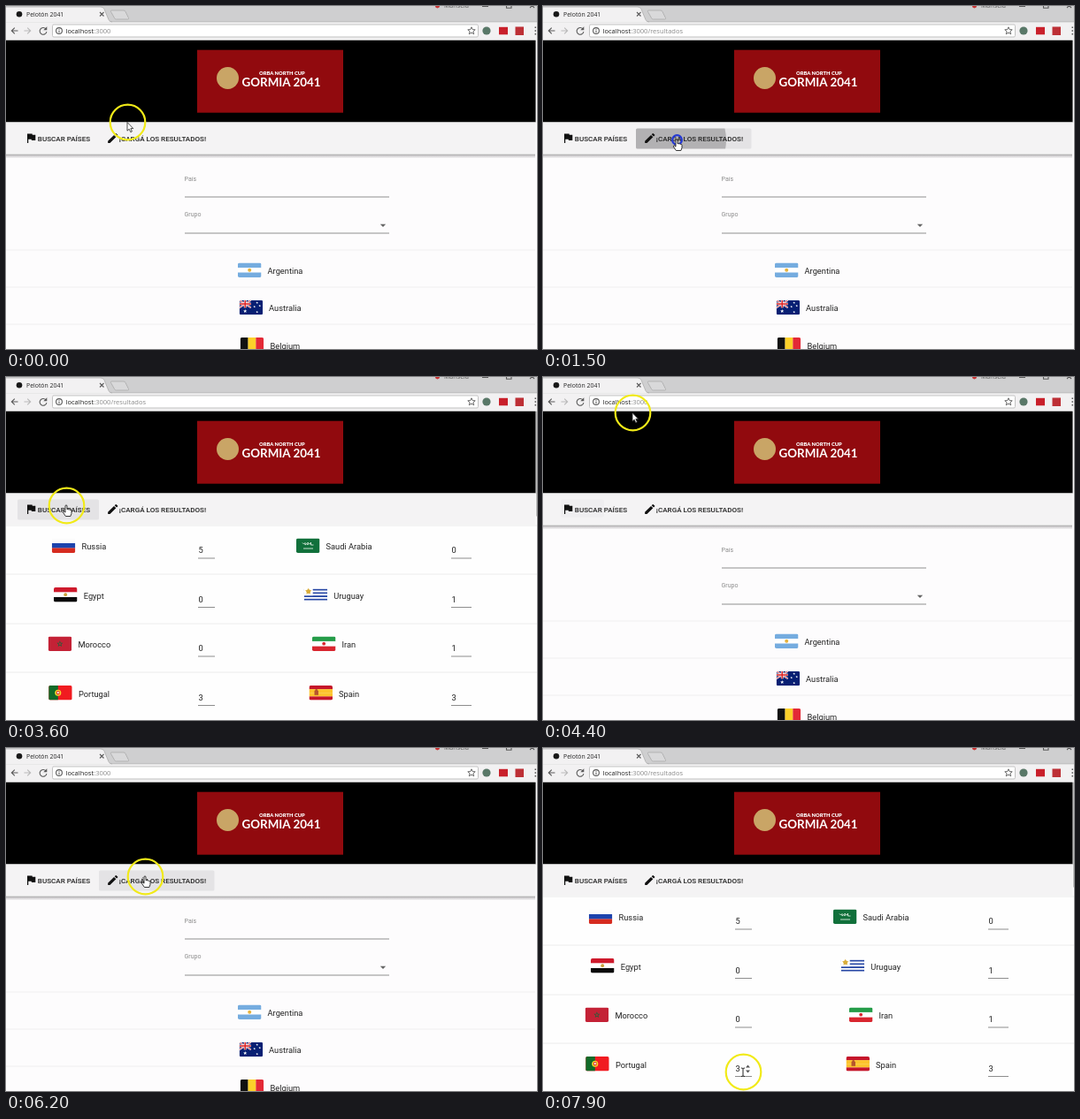
Recreate the animation shown at these times as an HTML page. Size 600 by 388 pixels, loop 8000 ms.

```html
<!DOCTYPE html>
<html lang="es">
<head>
<meta charset="utf-8">
<title>Pelotón 2041</title>
<style>
html, body { margin: 0; width: 100%; height: 100%; overflow: hidden; background: #fdfcfd; }
svg { display: block; width: 600px; height: 388px; }
text { font-family: Roboto, sans-serif; font-size: 9.3px; fill: #222; white-space: pre; }
.ui { font-family: "Open Sans", "Noto Sans", sans-serif; font-size: 7.55px; }
.nav { font-size: 8.08px; font-weight: 500; }
.label { font-size: 7px; fill: #8c8c8c; }
.brand { font-family: Lato, sans-serif; font-weight: 700; fill: #fff; }
.line { fill: none; stroke: #5a5a5a; stroke-width: 1.1; }
</style>
</head>
<body>
<svg viewBox="0 0 600 388">
  <defs>
    <clipPath id="round"><rect width="26.5" height="16.5" rx="1.8"/></clipPath>
    <clipPath id="buttonClip"><rect id="clipBox" y="139" height="23" rx="1.5"/></clipPath>
    <linearGradient id="shade" x2="0" y2="1">
      <stop offset="0" stop-color="#9c9a9c"/><stop offset=".35" stop-color="#cbc9cb"/><stop offset="1" stop-color="#fdfcfd"/>
    </linearGradient>
  </defs>
  <rect width="600" height="388" fill="#fdfcfd"/>

  <g transform="translate(0 -.5)">
    <g id="form">
      <rect y="168" width="598" height="5" fill="url(#shade)"/>
      <text class="label" x="201.5" y="198">País</text>
      <text class="label" x="201.5" y="238.5">Grupo</text>
      <path d="M202 216.5H433M202 257.5H433" stroke="#8f8f8f"/>
      <path d="M422.8 247.2h6.4l-3.2 3.2z" fill="#666"/>
      <path d="M0 276.5H598M0 318.5H598M0 360.5H598" stroke="#f0eff0"/>
    </g>
    <g id="results">
      <rect y="168" width="600" height="221" fill="#fefefe"/>
      <path d="M0 168.5H600M0 223.5H600M0 279.5H600M0 334.5H600" stroke="#ececec"/>
    </g>

    <rect y="39" width="598.5" height="93" fill="#000"/>
    <rect x="216" y="50.2" width="165" height="71" fill="#910a0e"/>
    <circle cx="250.5" cy="82" r="12.5" fill="#c9a566"/>
    <text class="brand" x="286" y="78.3" style="font-size:5.8px;font-weight:900">ORBA NORTH CUP</text>
    <text class="brand" x="266.5" y="91.5" style="font-size:13.4px">GORMIA 2041</text>

    <rect y="132" width="598.5" height="36" fill="#f4f3f4"/>
    <rect id="focus" x="20" y="139" width="49" height="20" rx="1.5" fill="#efeef0"/>
    <rect id="hover" y="139" height="23" rx="1.5" fill="#e4e3e5"/>
    <g clip-path="url(#buttonClip)"><circle id="ripple" fill="#000"/></g>
    <path transform="translate(20.9 142.6) scale(.62)" d="M14.4 6L14 4H5v17h2v-7h5.6l.4 2h7V6z" fill="#111"/>
    <path transform="translate(113.3 142.6) scale(.62)" d="M3 17.25V21h3.75L17.81 9.94l-3.75-3.75zM20.71 7.04a1 1 0 0 0 0-1.41l-2.34-2.34a1 1 0 0 0-1.41 0l-1.83 1.83 3.75 3.75z" fill="#111"/>
    <text class="nav" x="35.8" y="153.1">BUSCAR PAÍSES</text>
    <text class="nav" x="127.8" y="153.1">¡CARGÁ LOS RESULTADOS!</text>
    <path id="edge" d="M599.5 39V158" stroke="#bdbdbd"/>

    <rect width="600" height="19" fill="#cfcfd0"/>
    <path d="M0 18.5H600" stroke="#b5b5b5"/>
    <rect y="19" width="600" height="20" fill="#f2f1f2"/>
    <path d="M0 19V1.5H107Q110 1.5 111 4L116 16Q117 18.5 120 19Z" fill="#f2f1f2"/>
    <path d="M0 1.5H107Q110 1.5 111 4L116 16Q117 18.5 120 18.5" fill="none" stroke="#acacac" stroke-width=".8"/>
    <path d="M119 5.5h14q1.5 0 2 1.5l3.5 7q.5 1.5-1 1.5h-13q-1.5 0-2-1.5l-4-7q-.5-1.5.5-1.5z" fill="#d9d9da" stroke="#aaa" stroke-width=".8"/>
    <circle cx="15" cy="9.8" r="3.3" fill="#191919"/>
    <text class="ui" x="23" y="12.2" style="font-size:6.9px">Pelotón 2041</text>
    <path class="line" d="M106 7.5l4.5 4.5m0-4.5l-4.5 4.5"/>
    <circle cx="487.5" cy=".3" r="2.6" fill="#c93434"/>
    <text class="ui" x="495" y="2.3" style="font-size:7px;fill:#555">Marisela</text>
    <path class="line" d="M538 1h7M565.5 0v2.8h5.5V0M592 2.5L594.5 0 597 2.5"/>
    <path class="line" d="M13.5 28.5h-7m3.3-3.4L6.3 28.5l3.5 3.4"/>
    <path class="line" style="stroke:#b9b9b9" d="M20.5 28.5h7m-3.3-3.4l3.5 3.4-3.5 3.4"/>
    <path class="line" d="M45 26.3a3.9 3.9 0 1 0 .9 3.3"/>
    <path d="M46.3 23.7v4h-4z" fill="#5a5a5a"/>
    <rect x="52.5" y="21.5" width="481" height="14" rx="1.5" fill="#fff" stroke="#c2c2c2"/>
    <circle class="line" cx="60" cy="28.5" r="3.4"/>
    <path d="M60 26.3v1M60 28v2.6" stroke="#555"/>
    <text class="ui" x="67.5" y="31">localhost<tspan id="route" fill="#8b8b8b"></tspan></text>
    <path class="line" style="stroke-width:.9" d="M526 24.3l1.2 2.8 3 .2-2.3 2 .8 3-2.7-1.7-2.7 1.7.8-3-2.3-2 3-.2z"/>
    <circle cx="543" cy="28.5" r="4.6" fill="#597868"/>
    <rect x="557" y="24.3" width="10" height="8.5" fill="#c9202b"/>
    <rect x="575.5" y="24" width="9.5" height="9.5" fill="#bd3036"/>
    <path d="M597.5 24h1.5v1.5h-1.5zM597.5 27.7h1.5v1.5h-1.5zM597.5 31.4h1.5v1.5h-1.5z" fill="#555"/>

    <path id="spinner" d="M229 362l2.5-3 2.5 3zM229 365h5l-2.5 3z" fill="#555"/>
    <g id="pointer">
      <circle id="ring" cx=".5" fill="none"/>
      <path id="arrow" d="M0 0V9.7L2.2 7.7 3.8 11.2 5.4 10.5 3.9 7.1H6.8Z" fill="#fff" stroke="#222" stroke-width=".8"/>
      <path id="hand" d="M-1 0Q0-1.2 1 0V4.2Q2 3.4 2.8 4.5 4 3.8 4.6 5 6 4.5 6 6V8.8L4.9 12H-.6L-3.6 7.6Q-3.6 6-2.3 6.5L-1 7.7Z" fill="#fff" stroke="#222" stroke-width=".9"/>
      <path id="beam" d="M-2-4.5Q0-4.5 0-3.5 0-4.5 2-4.5M0-3.5V4M-2 5Q0 5 0 4 0 5 2 5" fill="none" stroke="#222"/>
    </g>
  </g>
</svg>
<script>
const $ = id => document.getElementById(id);
const W = 26.5, H = 16.5;
const rect = (x, y, w, h, fill) => `<rect x="${x}" y="${y}" width="${w}" height="${h}" fill="${fill}"/>`;
const dot = (x, y, r, fill) => `<circle cx="${x}" cy="${y}" r="${r}" fill="${fill}"/>`;
const stroke = (d, color, w) => `<path d="${d}" fill="none" stroke="${color}" stroke-width="${w}"/>`;
const rows = (...c) => c.map((f, i) => rect(0, i * H / c.length, W, H / c.length + .1, f)).join('');
const cols = (...c) => c.map((f, i) => rect(i * W / c.length, 0, W / c.length + .1, H, f)).join('');

function star(x, y, r, fill) {
  const pts = Array.from({ length: 10 }, (_, i) => {
    const a = i * Math.PI / 5 - Math.PI / 2, q = i % 2 ? r * .42 : r;
    return `${x + q * Math.cos(a)},${y + q * Math.sin(a)}`;
  });
  return `<polygon points="${pts.join(' ')}" fill="${fill}"/>`;
}

const diagonals = 'M0 0L13 8.5M13 0L0 8.5', cross = 'M6.5 0V8.5M0 4.25H13';
const flags = {
  Argentina: rows('#75acdf', '#fff', '#75acdf') + dot(13.2, 8.2, 2, '#e8b33d'),
  Australia: rect(0, 0, W, H, '#071f73') + stroke(diagonals, '#fff', 1.8) + stroke(diagonals, '#d22', .7) +
    stroke(cross, '#fff', 2.8) + stroke(cross, '#d22', 1.5) + star(6.5, 12.5, 2.2, '#fff') +
    [[20, 3], [17, 7.5], [23, 6.5], [20, 13.5]].map(p => star(...p, 1.4, '#fff')).join(''),
  Belgium: cols('#111', '#fcd12a', '#e32936'),
  Russia: rows('#fbfbfb', '#1c43ad', '#d62b1f'),
  'Saudi Arabia': rect(0, 0, W, H, '#11703b') +
    stroke('M7 5q1.5 3 3 0v2.5q2-3 3 0V4.5q2 4 3.5 0v3h3M8 11.5H19', '#dcebdf', .9),
  Egypt: rows('#ce1a2c', '#fff', '#0a0a0a') + dot(13.2, 8.2, 1.9, '#c9a03a'),
  Uruguay: rows('#fff', '#2747a4', '#fff', '#2747a4', '#fff', '#2747a4', '#fff', '#2747a4', '#fff') +
    rect(0, 0, 10, 9.2, '#fff') + star(5, 4.6, 4, '#d9ad3a') + dot(5, 4.6, 2.4, '#d9ad3a'),
  Morocco: rect(0, 0, W, H, '#c42236') + star(13.2, 8.5, 3.7, '#17643a') + star(13.2, 8.5, 2, '#c42236'),
  Iran: rows('#249c48', '#fff', '#d8262f') + dot(13.2, 8.2, 1.9, '#d8262f') +
    stroke('M0 5.7H26.5M0 10.8H26.5', '#ffffff99', .6),
  Portugal: rect(0, 0, W, H, '#f11b20') + rect(0, 0, 10.6, H, '#126a28') +
    dot(10.6, 8.2, 3.5, '#f4d82c') + rect(8.9, 6.2, 3.4, 4, '#e22d2d') + rect(9.8, 7.1, 1.6, 2, '#fff'),
  Spain: rows('#c5162a', '#fcc32c', '#fcc32c', '#c5162a') + rect(6, 5.8, 4.5, 5, '#b6552c') + dot(8.2, 5.4, 1.4, '#b6552c')
};

const entry = (name, x, y, textX) =>
  `<g transform="translate(${x} ${y})" clip-path="url(#round)">${flags[name]}</g>
   <text x="${textX}" y="${y + 12.6}">${name}</text>`;
const score = (x, y, n, w) =>
  `<text x="${x}" y="${y + 16.8}">${n}</text>` + stroke(`M${x - .5} ${y + 22.5}h${w}`, '#8d8d8d', 1);
const add = (id, markup) => $(id).insertAdjacentHTML('beforeend', markup);

[['Argentina', 262, 295.5], ['Australia', 263.7, 297], ['Belgium', 264.7, 298.5]].forEach(([name, x, textX], i) =>
  add('form', entry(name, x, 291 + i * 42.2, textX)));

[
  ['Russia', 51.8, 5, 'Saudi Arabia', 328, 0],
  ['Egypt', 54, 0, 'Uruguay', 336.7, 1],
  ['Morocco', 47.7, 0, 'Iran', 346, 1],
  ['Portugal', 48.2, 3, 'Spain', 342.5, 3]
].forEach(([home, hx, hs, away, ax, as], i) => {
  const y = 183 + i * 55.5;
  add('results', entry(home, hx, y, hx + 33.7) + score(217.5, y, hs, 19) +
    entry(away, ax, y, ax + 33.5) + score(503.5, y, as, 23));
});

const LOOP = 8000;
// time, x, y
const path = [
  [0, 137, 132], [500, 143, 140], [1000, 151, 152], [1900, 151, 152], [2300, 120, 105], [2800, 76, 50.5],
  [3000, 43, 28], [3250, 140, 34], [3600, 68, 146], [4100, 66, 147], [4400, 101, 41],
  [4800, 43, 28], [5000, 43, 28], [5400, 139, 115.5], [5800, 154, 141], [6200, 157, 146], [7200, 158, 148],
  [7400, 172, 188], [7600, 212, 250], [7750, 222, 310], [7900, 226, 367], [8000, 226, 367]
];
const clicks = [1300, 3600, 4800, 6400];
const visits = [[1500, 1700], [3800, 4000], [6600, 6800]]; // address, page
const buttons = [[13, 92], [105, 130.5]];
const ease = k => k * k * (3 - 2 * k);

function locate(t) {
  const i = path.findIndex(p => p[0] > t);
  const [t0, x0, y0] = path[i - 1], [t1, x1, y1] = path[i];
  const k = ease((t - t0) / (t1 - t0));
  return [x0 + (x1 - x0) * k, y0 + (y1 - y0) * k];
}

function set(id, attrs) {
  for (const key in attrs) $(id).setAttribute(key, attrs[key]);
}
const show = (id, on) => $(id).style.display = on ? '' : 'none';

function draw(t) {
  const [x, y] = locate(t);
  const atResults = col => visits.filter(v => t >= v[col]).length % 2 === 1;
  const results = atResults(1);
  show('form', !results);
  show('results', results);
  show('edge', results);
  $('route').textContent = atResults(0) ? ':3000/resultados' : ':3000';

  const button = y >= 139 && y <= 162 && buttons.find(([bx, bw]) => x >= bx && x <= bx + bw);
  show('hover', button);
  if (button) {
    const box = { x: button[0], width: button[1] };
    set('hover', box);
    set('clipBox', box);
  }
  show('focus', t >= 4000 && t < 5000);

  const since = t - (clicks.filter(c => c <= t).pop() ?? -LOOP);
  const rippling = button && since > 0 && since < 600;
  show('ripple', rippling);
  if (rippling) set('ripple', { cx: x, cy: y, r: since * .28, opacity: .22 * Math.min(1, (600 - since) / 300) });

  const pressed = since >= 100 && since <= 200;
  set('ring', {
    r: pressed ? 17 - since * .058 : 19.8,
    stroke: pressed ? '#2438d2' : '#f1ea18',
    'stroke-width': 2.2
  });
  const typing = t >= 7900;
  show('arrow', !button && !typing);
  show('hand', button);
  show('beam', typing);
  show('spinner', typing);
  set('pointer', { transform: `translate(${x} ${y})` });
}

const start = performance.now();
function tick(now) {
  const t = Math.max(0, now - start) % LOOP;
  draw(Math.floor(t / 100) * 100);
  requestAnimationFrame(tick);
}
draw(0);
requestAnimationFrame(tick);
</script>
</body>
</html>
```
